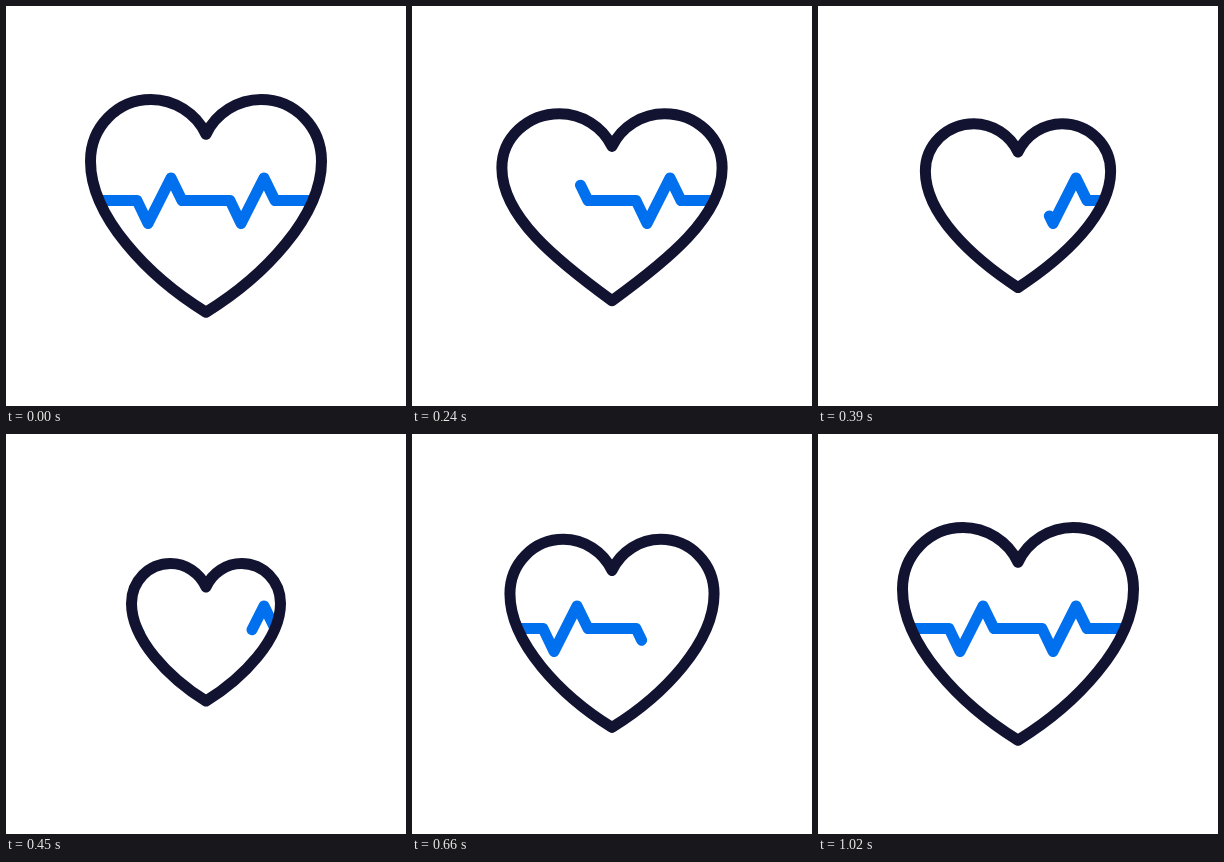
These frames come from a looping animation (400x400 px, 1290 ms). An HTML page:

```html
<!DOCTYPE html>
<html lang="en">
<head>
<meta charset="utf-8">
<title>Heartbeat</title>
<style>
  html, body { margin: 0; width: 100%; height: 100%; overflow: hidden; background: #fff; }
  svg { display: block; width: 100%; height: 100%; }
  path { fill: none; stroke-width: 11; stroke-linecap: round; stroke-linejoin: round; }
  .pulse { stroke: #0070ee; }
  #heart { stroke: #121331; }
</style>
</head>
<body>
<svg viewBox="0 0 400 400">
  <clipPath id="inside"><path id="clip"/></clipPath>
  <g clip-path="url(#inside)">
    <path class="pulse" id="leaving"/>
    <path class="pulse" id="entering"/>
  </g>
  <path id="heart"/>
</svg>
<script>
const LOOP = 1290, STEP = 30;
const $ = id => document.getElementById(id);
const clamp = v => Math.min(1, Math.max(0, v));
const progress = (t, from, to) => clamp((t - from) / (to - from));

const smooth = u => u * u * (3 - 2 * u);
const settle = u => u + u * u - u * u * u;
const glide = u => 1 - Math.pow(1 - u, 1.67);

// Pose: half width, top, notch, bottom, steepness of the tip
const rest = [115.5, 93.5, 128.3, 306.3, 0.168];
const beats = [
  { at: 0, pose: rest },
  { at: 150, pose: [80.9, 129.2, 153.7, 269.7, 0.215], ease: smooth },
  { at: 300, pose: [126, 96, 133.2, 308.3, 0.215], ease: smooth },
  { at: 450, pose: [74.5, 129.5, 153, 267, 0.168], ease: smooth },
  { at: 840, pose: rest, ease: settle }
];

function poseAt(t) {
  const i = beats.findIndex(b => b.at > t);
  if (i < 0) return rest;
  const a = beats[i - 1], b = beats[i];
  const k = b.ease(progress(t, a.at, b.at));
  return a.pose.map((v, n) => v + (b.pose[n] - v) * k);
}

function heartPath([half, top, notch, bottom, steep]) {
  const h = bottom - top, side = top + h * 0.29, dip = notch - 0.61 * (notch - top);
  const lobe = dir => {
    const p = (x, y) => `${(200 + dir * half * x).toFixed(2)} ${y.toFixed(2)} `;
    return `M200 ${notch}C` + p(0.087, dip) + p(0.277, top) + p(0.476, top) +
      'C' + p(0.77, top) + p(1, top + h * 0.13) + p(1, side) +
      'C' + p(1, side + h * 0.26) + p(0.502, bottom - h * steep) + p(0, bottom);
  };
  return lobe(-1) + lobe(1);
}

const pulse = 'M84 194.5H131L142 217.5L165 172L176 194.5H224L235 217.5L258 172L269 194.5H316';
const lines = [$('leaving'), $('entering')];
lines.forEach(line => line.setAttribute('d', pulse));
const length = lines[0].getTotalLength();

function trim(line, from, to) {
  line.style.display = to > from ? '' : 'none';
  line.setAttribute('stroke-dasharray', `${(to - from) * length} ${length * 2}`);
  line.setAttribute('stroke-dashoffset', -from * length);
}

function draw(t) {
  const d = heartPath(poseAt(t));
  $('heart').setAttribute('d', d);
  $('clip').setAttribute('d', d);
  trim(lines[0], progress(t, 0, 630), 1);
  trim(lines[1], 0, glide(progress(t, 390, 1020)));
}

const start = performance.now();
function tick() {
  const t = (performance.now() - start) % LOOP;
  draw(Math.floor(t / STEP) * STEP);
  requestAnimationFrame(tick);
}
tick();
</script>
</body>
</html>
```
